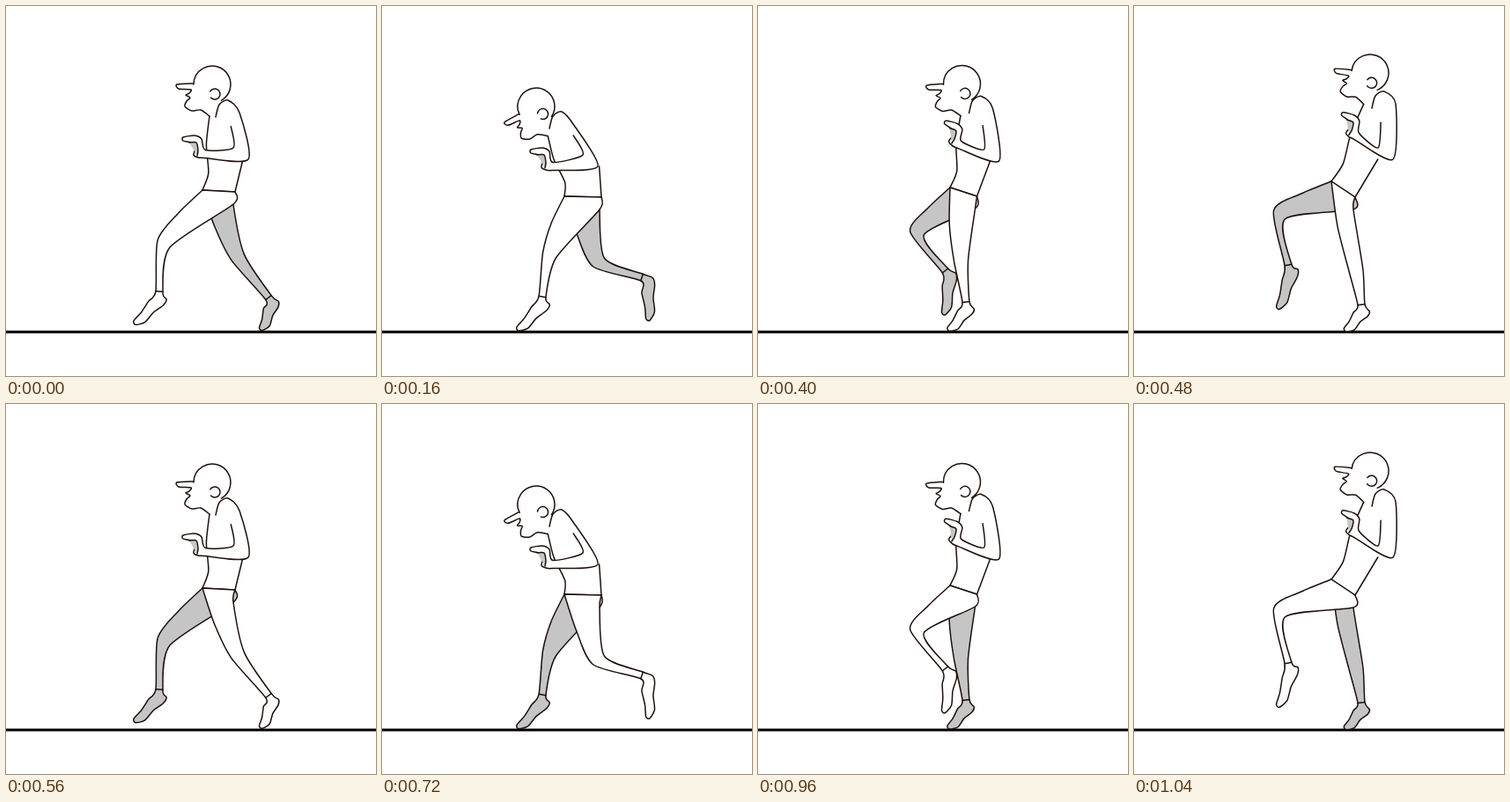
Animation, 420 px wide and 420 px high, one loop 1.12 s. Source, as an HTML page with a canvas:

```html
<!DOCTYPE html>
<html lang="en">
<head>
<meta charset="utf-8">
<title>Walk cycle</title>
<style>
  html, body { margin: 0; width: 100%; height: 100%; overflow: hidden; background: #fff; }
  canvas { display: block; width: 420px; height: 420px; }
</style>
</head>
<body>
<canvas id="stage" width="420" height="420"></canvas>
<script>
const ctx = document.getElementById('stage').getContext('2d');
const INK = '#1e0f0a', GREY = '#c5c5c5', WHITE = '#fff';
const STEP_MS = 80, HALF = 7;

// Joints of the four key poses of one stride.
// A leg is knee, ankle, toe; the waist is front, back.
const contact = {
  head: [234, 89], tilt: 0,
  shoulder: [252, 107], elbow: [275, 174], wrist: [226, 168], turn: 0,
  waist: [[223, 209], [260, 211]],
  plant: [[179, 270], [174, 324], [146, 361]],
  swing: [[263, 285], [298, 331], [290, 368]]
};
const down = {
  head: [175, 114], tilt: -0.46,
  shoulder: [204, 120], elbow: [245, 182], wrist: [194, 182], turn: 0,
  waist: [[207, 216], [249, 217]],
  plant: [[190, 283], [182, 330], [154, 368]],
  swing: [[246, 291], [295, 308], [303, 357]]
};
const passing = {
  head: [195, 101], tilt: -0.2,
  shoulder: [223, 108], elbow: [253, 178], wrist: [205, 167], turn: 0.4,
  waist: [[212, 213], [246, 215]],
  plant: [[209, 279], [214, 333], [193, 368]],
  swing: [[196, 279], [250, 307], [259, 357]]
};
const up = {
  head: [268, 76], tilt: 0.12,
  shoulder: [284, 97], elbow: [294, 174], wrist: [253, 148], turn: 0.4,
  waist: [[224, 199], [251, 217]],
  plant: [[252, 300], [258, 339], [240, 369]],
  swing: [[165, 237], [175, 294], [164, 344]]
};
const keys = [contact, down, passing, up];

// Small shapes around their own joint.
const FACE = [[-21, -1], [-40, 0], [-38, 5], [-24, 6], [-26, 10], [-30, 12], [-25, 15],
  [-29, 19], [-31, 25], [-23, 30], [-13, 29], [-3, 36]];
const HAND = [[-8, 4], [-13, 1], [-11, -8], [-16, -13], [-25, -15], [-25, -19],
  [-12, -21], [-4, -17]];
const FAR_HAND = [[-18, -13], [-10, -13], [-8, -4], [-9, 2]];
// Along the foot as a share of its length, then across it in pixels.
const FOOT = [[0.35, -3], [0.68, -2], [0.95, -3], [1, 1], [0.82, 8], [0.5, 9],
  [0.22, 13], [0.05, 12]];

function mix(a, b, u) {
  if (typeof a === 'number') return a + (b - a) * u;
  if (Array.isArray(a)) return a.map((v, i) => mix(v, b[i], u));
  return Object.fromEntries(Object.keys(a).map(k => [k, mix(a[k], b[k], u)]));
}

const add = (p, q, k = 1) => [p[0] + q[0] * k, p[1] + q[1] * k];
const sub = (p, q) => add(p, q, -1);

// Unit vector square to p-q, on the walker's back side.
function side(p, q) {
  const [x, y] = sub(q, p), len = Math.hypot(x, y);
  return [y / len, -x / len];
}

function place(pts, [x, y], angle) {
  const c = Math.cos(angle), s = Math.sin(angle);
  return pts.map(([px, py]) => [x + px * c - py * s, y + px * s + py * c]);
}

// Gently rounded line through the points.
function curve(pts) {
  const last = pts.length - 1, c = 1 / 8;
  ctx.lineTo(...pts[0]);
  for (let i = 0; i < last; i++) {
    const q = pts[i], r = pts[i + 1];
    const a = add(q, sub(r, pts[Math.max(0, i - 1)]), c);
    const b = add(r, sub(pts[Math.min(last, i + 2)], q), -c);
    ctx.bezierCurveTo(...a, ...b, ...r);
  }
}

function ink(fill) {
  if (fill) { ctx.fillStyle = fill; ctx.fill(); }
  ctx.stroke();
}

function draw(pts, fill, closed) {
  ctx.beginPath();
  curve(pts);
  if (closed) ctx.closePath();
  ink(fill);
}

function drawLeg([front, back], [knee, ankle, toe], fill) {
  const hip = mix(front, back, 0.5);
  const kneeSide = side(hip, ankle), ankleSide = side(knee, ankle), footSide = side(ankle, toe);
  const kneeFront = add(knee, kneeSide, -8), kneeBack = add(knee, kneeSide, 8);
  const ankleFront = add(ankle, ankleSide, -4), ankleBack = add(ankle, ankleSide, 4);
  const thigh = add(mix(front, kneeFront, 0.5), side(front, kneeFront), -3);
  const foot = FOOT.map(([u, v]) => add(mix(ankle, toe, u), footSide, v));
  const seat = add(back, [-2, 14]);
  draw([front, thigh, kneeFront, ankleFront, ...foot, ankleBack, kneeBack, seat, back], fill, true);
  draw([ankleFront, ankleBack]);
}

function drawTorso({ head, tilt, elbow, waist: [front, back] }) {
  const neck = place(FACE.slice(-1), head, tilt)[0];
  const belly = add(mix(front, neck, 0.23), [5, 0]);
  const chest = add(mix(neck, belly, 0.5), [-3, 0]);
  draw([neck, chest, belly, front]);
  draw([[mix(back[0], elbow[0], 0.6), elbow[1]], back]);
}

function drawHead({ head, tilt }) {
  ctx.beginPath();
  ctx.arc(...head, 21, tilt + 1.05, tilt - Math.PI, true);
  curve(place(FACE, head, tilt));
  ink(WHITE);
  const [ear] = place([[3, 11]], head, tilt);
  ctx.beginPath();
  ctx.arc(...ear, 6, tilt - 2.6, tilt + 2.4);
  ink();
}

function drawArm({ shoulder, elbow, wrist, turn }) {
  const across = side(elbow, wrist);
  const bend = add(elbow, [-17, -13]);
  draw([
    add(shoulder, [-14, 19]), add(shoulder, [-10, 5]), shoulder, add(shoulder, [13, 14]), elbow,
    add(wrist, across, 4.5), ...place(HAND, wrist, turn), add(wrist, across, -4.5),
    bend, mix(bend, shoulder, 0.45)
  ], WHITE);
  draw(place(FAR_HAND, wrist, turn), GREY);
}

function render(step) {
  const k = (step % HALF) / 2, i = Math.floor(k);
  const pose = mix(keys[i], keys[Math.min(i + 1, 3)], k - i);
  const nearPlanted = step < HALF;

  ctx.fillStyle = WHITE;
  ctx.fillRect(0, 0, 420, 420);
  ctx.fillStyle = '#000';
  ctx.fillRect(0, 368.5, 420, 3);

  ctx.strokeStyle = INK;
  ctx.lineWidth = 1.5;
  ctx.lineJoin = ctx.lineCap = 'round';

  // The far leg's passing step sinks a little.
  const sink = nearPlanted ? 0 : 3 * Math.max(0, 1 - 2 * Math.abs(k - 2));
  ctx.save();
  ctx.translate(0, sink);
  drawLeg(pose.waist, nearPlanted ? pose.swing : pose.plant, GREY);
  drawLeg(pose.waist, nearPlanted ? pose.plant : pose.swing, WHITE);
  drawTorso(pose);
  drawHead(pose);
  drawArm(pose);
  ctx.restore();
}

const start = performance.now();
let shown = -1;
function tick() {
  const step = Math.floor((performance.now() - start) / STEP_MS) % (HALF * 2);
  if (step !== shown) render(shown = step);
  requestAnimationFrame(tick);
}
tick();
</script>
</body>
</html>
```
